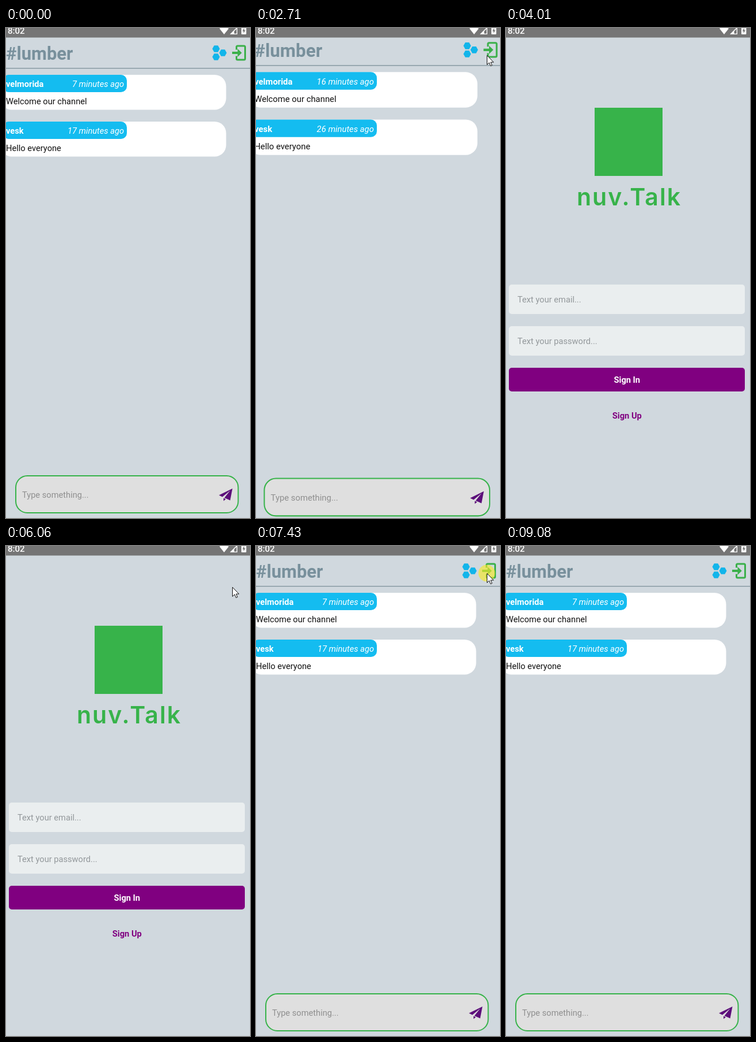
Recreate the animation shown at these times as an HTML page. Size 424 by 848 pixels, loop 9420 ms.

```html
<!DOCTYPE html>
<html lang="en">
<head>
<meta charset="utf-8">
<title>Chat sign out</title>
<style>
  html, body { margin: 0; width: 100%; height: 100%; overflow: hidden; background: #d0d8de; }
  svg { display: block; width: 100vw; height: 100vh; }
  text { font: 400 14.65px Roboto, sans-serif; white-space: pre; }
  .bold { font-weight: 700; }
  .when { font-style: italic; fill: #fff; text-anchor: end; }
  .mid { text-anchor: middle; }
  .hint { fill: #93989b; }
</style>
</head>
<body>
<svg viewBox="0 0 424 848">
  <defs>
    <clipPath id="below"><rect y="17" width="424" height="831"/></clipPath>
    <polygon id="hex" points="-6.5,0 -3.25,-5.8 3.25,-5.8 6.5,0 3.25,5.8 -3.25,5.8"/>
  </defs>
  <rect width="424" height="848" fill="#d0d8de"/>

  <g clip-path="url(#below)">
    <g id="chat">
      <rect y="17" width="424" height="831" fill="#d0d8de"/>
      <text class="bold" x="0" y="55" fill="#78909c" style="font-size:31px">#lumber</text>
      <rect x="-10" y="69" width="444" height="1.4" fill="#84979f"/>
      <g fill="#12b5ea">
        <use href="#hex" x="365" y="36"/>
        <use href="#hex" x="377" y="43"/>
        <use href="#hex" x="365" y="50"/>
      </g>
      <path d="M400.5 37.5V33Q400.5 31 402.5 31H413.500Q415.500 31 415.500 33V53Q415.500 55 413.500 55H402.500Q400.500 55 400.500 53V48.500" fill="none" stroke="#3bb04a" stroke-width="3"/>
      <path d="M393 41h9.500v-5l7.300 7 -7.300 7v-5H393z" fill="#3bb04a"/>
      <g id="messages"></g>
      <rect x="17" y="775" width="386.500" height="64" rx="20" fill="#dfdfdf" stroke="#37b34a" stroke-width="2"/>
      <text x="28" y="812.500" fill="#8f8f8f">Type something...</text>
      <path d="M393.500 797L370 808.500 376 811.500 389.500 800.500 379.500 813 389.500 817.500zM378 813.500V818.500L382 815.300z" fill="#5c0f7a"/>
    </g>

    <g id="login">
      <rect y="17" width="424" height="831" fill="#d0d8de"/>
      <rect x="154" y="138" width="118" height="118" fill="#37b34a"/>
      <text class="mid" x="214" y="307" fill="#37b34a" style="font:600 41px Inter, sans-serif;letter-spacing:2px">nuv.Talk</text>
      <rect x="5" y="444" width="410" height="51" rx="5" fill="#eaeeef"/>
      <text class="hint" x="20" y="475">Text your email...</text>
      <rect x="5" y="516" width="410" height="51" rx="5" fill="#eaeeef"/>
      <text class="hint" x="20" y="547">Text your password...</text>
      <rect x="5" y="588" width="410" height="41" rx="5" fill="#800080"/>
      <text class="bold mid" x="210.300" y="614" fill="#fff">Sign In</text>
      <text class="bold mid" x="210.300" y="676" fill="#800080">Sign Up</text>
    </g>
  </g>

  <rect width="424" height="16.500" fill="#757575"/>
  <text x="3" y="10" fill="#fff" style="font-size:15px;font-weight:500">8:02</text>
  <path d="M371 1Q379 -5 387 1L379 11z" fill="#fff"/>
  <path d="M389 11L402 -2V11z" fill="#fff"/>
  <path d="M396.500 9.700V5.500L400.700 1.500V9.700z" fill="#757575"/>
  <rect x="409" y="-3" width="8.500" height="14" rx="1" fill="#fff"/>
  <path d="M414 0L410.800 5.600H412.800V9L416 3.700H414z" fill="#757575"/>

  <circle id="click" cx="401" cy="47" r="14.500" fill="#f5ea2a" opacity=".65"/>
  <path id="cursor" d="M.500 .500V16.500L4.200 13 6.700 18.700 9.200 17.600 6.800 12.200H11.800z" fill="#fff" stroke="#111" stroke-width="1"/>
</svg>

<script>
const LOOP = 9420, HALF = LOOP / 2;
const SWAP_START = 2672, SWAP_TIME = 400;
const $ = id => document.getElementById(id);
const clamp = (v, a = 0, b = 1) => Math.min(b, Math.max(a, v));
const smooth = p => p * p * (3 - 2 * p);
const bez = (a, b, c, d, u) => {
  const v = 1 - u;
  return v * v * v * a + 3 * v * v * u * b + 3 * v * u * u * c + u * u * u * d;
};

// Each move: start, end, easing, then four Bezier points.
const moves = [
  [340, 610, smooth, [418, 751], [360, 500], [308, 60], [369, 148]],
  [910, 1500, smooth, [369, 148], [376, 115], [388, 75], [401, 48]],
  [3270, 3540, smooth, [401, 47], [408, 47], [326, 145], [376, 697]],
  [3900, 4010, p => p * p, [376, 697], [382, 740], [394, 790], [402, 852]]
];

const messages = [
  { y: 81, user: 'velmorida', text: 'Welcome our channel', age: 7 },
  { y: 162, user: 'vesk', text: 'Hello everyone', age: 17 }
];
$('messages').innerHTML = messages.map(m => `
  <g transform="translate(0 ${m.y})">
    <rect x="-10" width="392.5" height="60.5" rx="20" fill="#fff"/>
    <rect x="-5" width="215" height="30" rx="10" fill="#14bcf0"/>
    <text class="bold" y="21" fill="#fff">${m.user}</text>
    <text class="when" x="205" y="21"></text>
    <text y="51" fill="#111">${m.text}</text>
  </g>`).join('');
const ages = [...document.querySelectorAll('.when')];

// Quick start with a very long slow-down, made of two curves.
function extraSlow(x) {
  const [xs, ys] = x < 1 / 6
    ? [[0, .05, .1333, 1 / 6], [0, 0, .06, .4]]
    : [[1 / 6, .2083, .25, 1], [.4, .82, 1, 1]];
  let lo = 0, hi = 1;
  for (let i = 0; i < 24; i++) {
    const mid = (lo + hi) / 2;
    if (bez(...xs, mid) < x) lo = mid; else hi = mid;
  }
  return bez(...ys, lo);
}

function cursorAt(t) {
  const move = moves.filter(m => t >= m[0]).pop();
  if (!move || t >= 4010) return null;
  const [start, end, ease, a, b, c, d] = move;
  const u = ease(clamp((t - start) / (end - start)));
  const at = i => bez(a[i], b[i], c[i], d[i], u);
  return [at(0), at(1) - (t >= 1860 && t < 3270 ? 1 : 0)];
}

function zoom(el, k) {
  el.setAttribute('transform', `translate(212 432) scale(${k}) translate(-212 -432)`);
}

function show(el, on) {
  el.style.display = on ? '' : 'none';
}

function draw(time) {
  const t = time < HALF ? time : LOOP - 1 - time; // plays forward, then back
  const swapping = t >= 2680, done = t >= 2950;
  const since = t - SWAP_START;
  const k = done ? 1 : swapping ? extraSlow(clamp(since / SWAP_TIME)) : 0;

  show($('chat'), !done);
  zoom($('chat'), 1 + .15 * k);
  show($('login'), swapping);
  zoom($('login'), .85 + .15 * k);
  $('login').setAttribute('opacity', done ? 1 : clamp((since - 50) / 83));
  ages.forEach((el, i) => {
    el.textContent = `${messages[i].age + (swapping ? 9 : 0)} minutes ago`;
  });

  show($('click'), t >= 1760 && t < 1990);
  const pos = cursorAt(t);
  show($('cursor'), pos);
  if (pos) $('cursor').setAttribute('transform', `translate(${pos[0]} ${pos[1]})`);
}

const begin = performance.now();
function tick() {
  draw((performance.now() - begin) % LOOP);
  requestAnimationFrame(tick);
}
tick();
</script>
</body>
</html>
```
